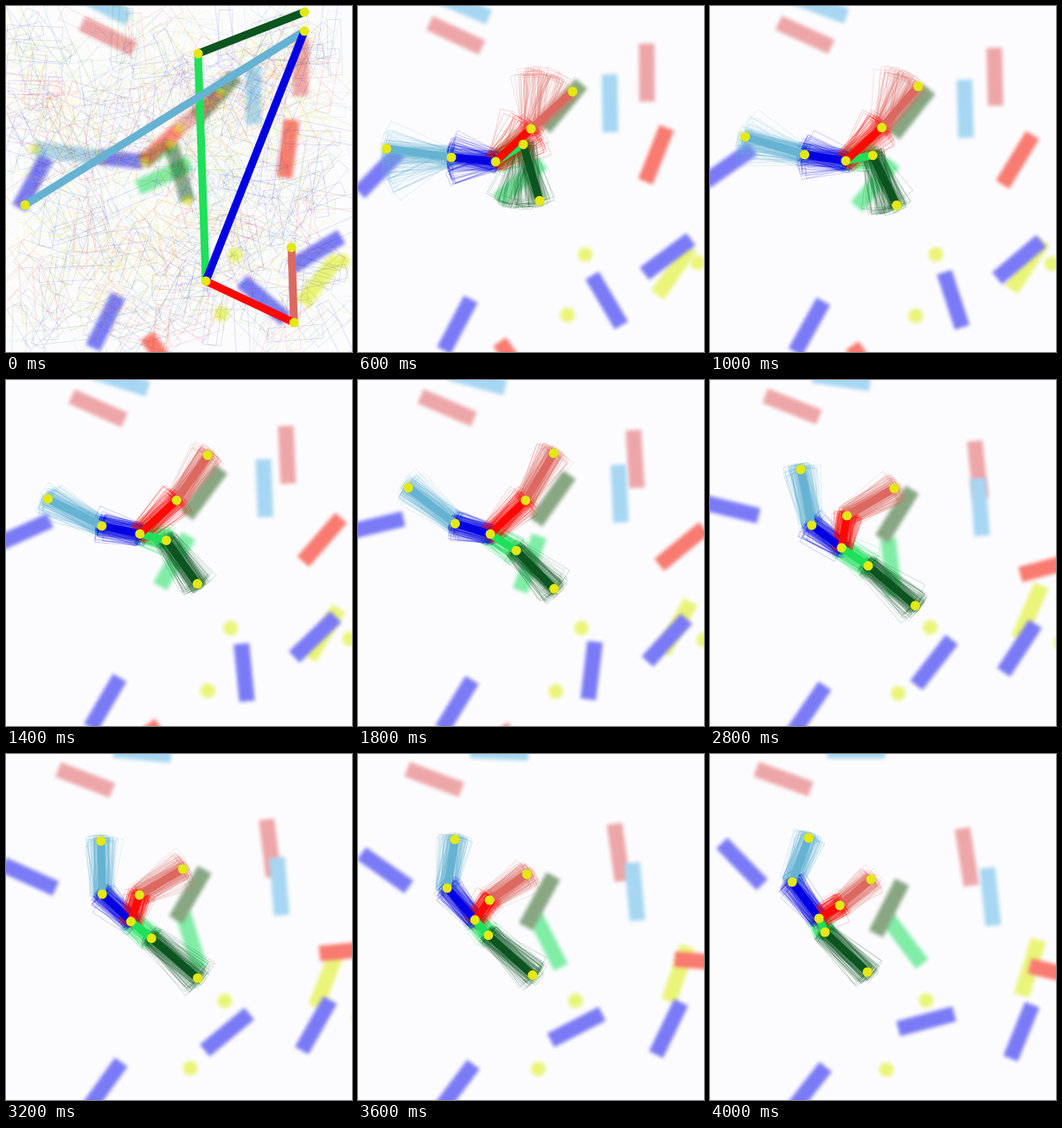
Recreate the animation shown at these times as an HTML page with a canvas. Size 400x400 px, loop 4.2 s.

```html
<!DOCTYPE html>
<html lang="en">
<head>
<meta charset="utf-8">
<title>Particle tracker</title>
<style>
html, body { margin: 0; width: 100%; height: 100%; overflow: hidden; background: #fcfcfe; }
canvas { display: block; width: 400px; height: 400px; }
</style>
</head>
<body>
<canvas id="stage" width="400" height="400"></canvas>
<script>
const ctx = document.getElementById('stage').getContext('2d');
const STEP = 200, STEPS = 21, LAST = STEPS - 1, LOCKED = 3;
const RAD = Math.PI / 180;

const SKY = '#a6d6f2', PINK = '#eda6a8', BLUE = '#7a7af6', RED = '#f87a70';
const OLIVE = '#88a682', MINT = '#80eca6', LEMON = '#eaf478', DOT = '#e4e814';

// Clutter drifts from one point to another while turning (degrees).
const bar = (color, from, to, angle, turn) => ({ color, from, to, angle, turn });
const clutter = [
  bar(LEMON, [363, 317], [370, 247], 128, -21),
  bar(PINK, [118, 35], [85, 29], 26, -6),
  bar(SKY, [112, -1], [169, -4], 27, -27),
  bar(PINK, [341, 70], [297, 119], 91, -10),
  bar(SKY, [286, 103], [324, 165], 90, -6),
  bar(RED, [326, 165], [402, 253], 97, 97),
  bar(RED, [182, 409], [188, 453], 55, 0),
  bar(BLUE, [31, 204], [37, 127], 118, 108),
  bar(BLUE, [115, 365], [113, 388], 116, 12),
  bar(BLUE, [359, 284], [360, 321], 149, -37),
  bar(BLUE, [298, 340], [250, 309], 41, 124),
  bar(MINT, [183, 196], [225, 216], 155, -102),
  bar(OLIVE, [243, 105], [207, 178], 132, -15)
];
const blobs = [
  bar(LEMON, [265, 288], [250, 285], 0, 0),
  bar(LEMON, [249, 356], [204, 365], 0, 0),
  bar(LEMON, [389, 295], [413, 307], 0, 0)
];

// Joint paths: key points evenly spaced from the lock-on to the last step.
const leftHand = [[33, 165], [55, 126], [108, 102], [114, 97]];
const leftElbow = [[108, 175], [112, 166], [118, 168], [95, 148]];
const hub = [[159, 180], [153, 177], [152, 195], [126, 190]];
const rightElbow = [[200, 142], [196, 138], [156, 158], [150, 175]];
const rightHand = [[248, 99], [227, 82], [212, 128], [186, 145]];
const knee = [[191, 160], [183, 196], [183, 216], [133, 206]];
const foot = [[210, 225], [226, 240], [238, 262], [182, 252]];
const joints = [leftHand, leftElbow, hub, rightElbow, rightHand, knee, foot];
const firstGuess = [[22, 230], [345, 29], [231, 318], [333, 366], [330, 279], [222, 55], [345, 7]];

// "lag" is how far, in degrees, the particles trail the limb at first.
const limb = (a, b, color, lag = 0) => ({ a: joints.indexOf(a), b: joints.indexOf(b), color, lag });
const limbs = [
  limb(hub, knee, '#1ee05a'),
  limb(knee, foot, '#0c5420', 18),
  limb(leftElbow, leftHand, '#66b2d2', -10),
  limb(rightElbow, rightHand, '#dc6860', -35),
  limb(hub, leftElbow, '#0000e2'),
  limb(hub, rightElbow, '#ff0804')
];

const clamp = v => Math.max(0, Math.min(1, v));
const mix = (p, q, u) => [p[0] + (q[0] - p[0]) * u, p[1] + (q[1] - p[1]) * u];

function seeded(seed) {
  return () => {
    seed = (seed + 0x6d2b79f5) | 0;
    let t = Math.imul(seed ^ (seed >>> 15), 1 | seed);
    t = (t + Math.imul(t ^ (t >>> 7), 61 | t)) ^ t;
    return ((t ^ (t >>> 14)) >>> 0) / 4294967296;
  };
}

function along(path, u) {
  const k = Math.min(path.length - 2, Math.floor(u * (path.length - 1)));
  return mix(path[k], path[k + 1], u * (path.length - 1) - k);
}

// The faster a piece turns, the more its path bows away from the chord.
function drift({ from, to, turn }, u) {
  const [x, y] = mix(from, to, u);
  const bow = 0.38 * turn * RAD * u * (1 - u);
  return [x + (to[1] - from[1]) * bow, y - (to[0] - from[0]) * bow];
}

function disc([x, y], r, color) {
  ctx.fillStyle = color;
  ctx.beginPath();
  ctx.arc(x, y, r, 0, 2 * Math.PI);
  ctx.fill();
}

function box([x, y], angle, draw) {
  ctx.save();
  ctx.translate(x, y);
  ctx.rotate(angle);
  draw();
  ctx.restore();
}

function drawClutter(u) {
  ctx.save();
  ctx.filter = 'blur(2px)';
  for (const b of blobs) disc(drift(b, u), 8.5, b.color);
  for (const b of clutter) {
    box(drift(b, u), (b.angle + b.turn * u) * RAD, () => {
      ctx.fillStyle = b.color;
      ctx.fillRect(-33.5, -9, 67, 18);
    });
  }
  ctx.restore();
}

function drawFigure(pose, width, radius) {
  ctx.lineWidth = width;
  for (const { a, b, color } of limbs) {
    ctx.strokeStyle = color;
    ctx.beginPath();
    ctx.moveTo(...pose[a]);
    ctx.lineTo(...pose[b]);
    ctx.stroke();
  }
  for (const p of pose) disc(p, radius, DOT);
}

function drawShadow(pose) {
  ctx.save();
  ctx.filter = 'blur(2px)';
  ctx.globalAlpha = 0.5;
  drawFigure(pose, 17, 6);
  ctx.restore();
}

function drawScatter(rand) {
  ctx.save();
  ctx.lineWidth = 0.7;
  ctx.globalAlpha = 0.16;
  for (let i = 0; i < 720; i++) {
    ctx.strokeStyle = i % 3 ? limbs[i % limbs.length].color : DOT;
    box([10 + rand() * 375, 15 + rand() * 370], rand() * 2 * Math.PI, () => {
      ctx.strokeRect(-32, -8, 64, 16);
    });
  }
  ctx.restore();
}

function drawParticles(pose, s, rand) {
  const early = clamp((7 - s) / 4);
  const spread = (11 + 15 * early) * RAD;
  const jitter = () => rand() + rand() + rand() - 1.5;
  ctx.save();
  ctx.lineWidth = 0.8;
  ctx.globalAlpha = 0.22;
  for (const { a, b, color, lag } of limbs) {
    const [x, y] = pose[a];
    const dx = pose[b][0] - x, dy = pose[b][1] - y;
    const angle = Math.atan2(dy, dx) + lag * early * RAD;
    ctx.strokeStyle = color;
    for (let i = 0; i < 50; i++) {
      box([x + jitter() * 6, y + jitter() * 6], angle + jitter() * spread, () => {
        ctx.strokeRect(-1, -8, Math.hypot(dx, dy) + 3, 16);
      });
    }
  }
  ctx.restore();
}

function render(s) {
  const rand = seeded(71 + s * 977);
  const u = clamp((s - LOCKED) / (LAST - LOCKED));
  const pose = joints.map(path => along(path, u));
  ctx.fillStyle = '#fcfcfe';
  ctx.fillRect(0, 0, 400, 400);
  drawClutter(s / LAST);
  drawShadow(pose);
  if (s === 0) drawScatter(rand);
  else drawParticles(pose, s, rand);
  drawFigure(s === 0 ? firstGuess : pose, 9, 5.5);
}

let start = null, shown = -1;
function tick(now) {
  start ??= now;
  const s = Math.floor((now - start) / STEP) % STEPS;
  if (s !== shown) render(shown = s);
  requestAnimationFrame(tick);
}
requestAnimationFrame(tick);
</script>
</body>
</html>
```
